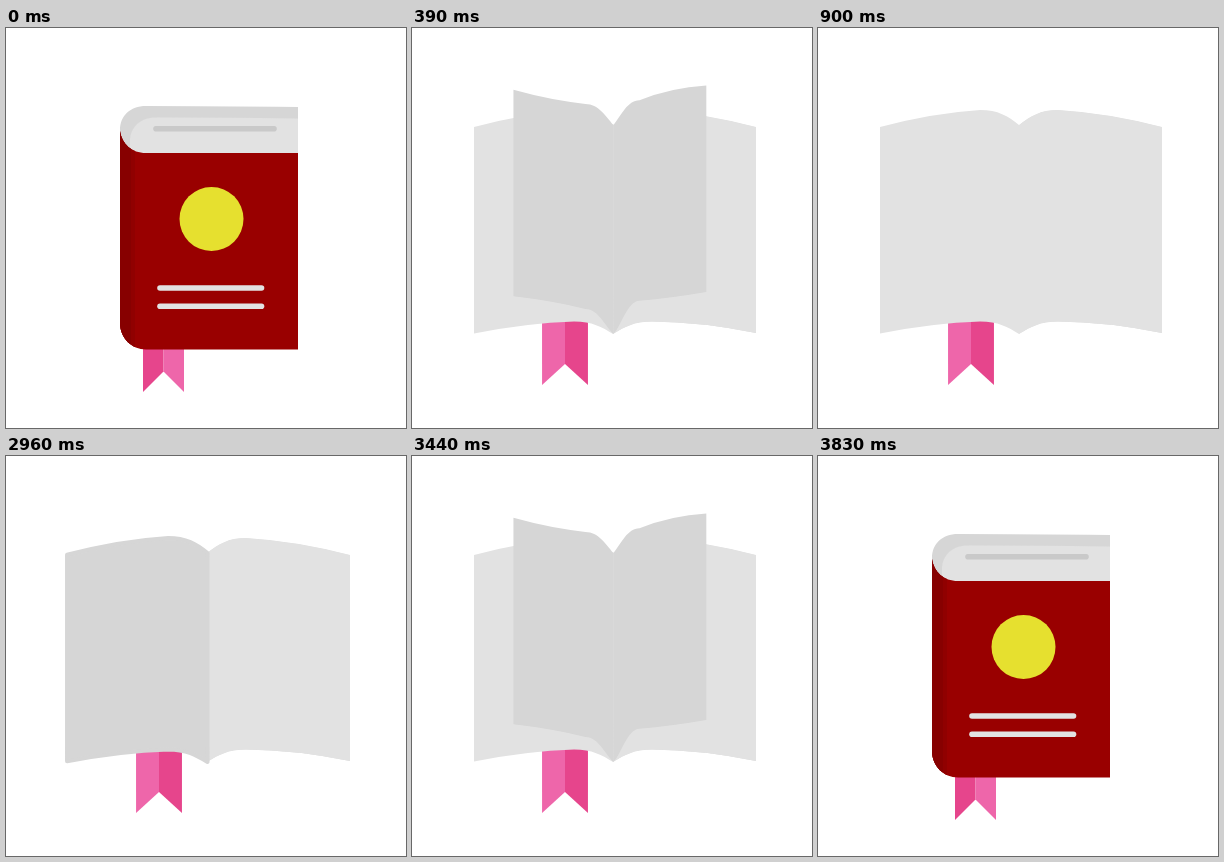
These frames come from a looping animation (400 by 400 pixels, 4860 ms). An HTML page with a canvas:

```html
<!DOCTYPE html>
<html lang="en">
<head>
<meta charset="utf-8">
<title>Opening book</title>
<style>
  html, body { margin: 0; width: 100%; height: 100%; overflow: hidden; background: #fff; }
  canvas { display: block; width: 400px; height: 400px; }
</style>
</head>
<body>
<canvas id="stage" width="400" height="400"></canvas>
<script>
const ctx = document.getElementById('stage').getContext('2d');
const LIGHT = '#e2e2e2', SHADE = '#d6d6d6';
const LOOP = 4860, STEP = 30, OPEN_AT = 900, CLOSE_AT = 2960, CLOSED_AT = 3830;
const COVER_TIME = 365, FLIP_TIME = 286, FIRST_FLIP = 175, FLIP_GAP = 137, FLIPS = 4;

const mix = (a, b, p) => a + (b - a) * p;
const clamp = v => Math.min(1, Math.max(0, v));
const smooth = v => v * v * (3 - 2 * v);

function fill(path, color) {
  ctx.fillStyle = color;
  ctx.fill(path);
}

function withClip(path, draw) {
  ctx.save();
  ctx.clip(path);
  draw();
  ctx.restore();
}

// A leaf bound at the spine; w is its signed width, lift raises the free edge.
function leafPath(spine, w, lift, lean) {
  const x = f => spine + w * f;
  const path = new Path2D();
  const knee = 82 - lift * (0.2 + 0.05 * lean);
  const foot = 293.5 - lift * (0.42 + 0.12 * lean);
  path.moveTo(spine, 97);
  path.bezierCurveTo(x(0.08), 88, x(0.15), knee, x(0.28), knee);
  path.quadraticCurveTo(x(0.62), 85 - lift * (0.48 + 0.2 * lean), x(1), 99 - lift);
  path.lineTo(x(1), 305.5 - lift);
  path.quadraticCurveTo(x(0.62), 295 - lift * 0.6, x(0.28), foot);
  path.bezierCurveTo(x(0.15), foot, x(0.08), 299, spine, 306);
  path.closePath();
  return path;
}

// Right-hand block of pages, from a rounded closed end to an open leaf.
function blockPath(spine, p) {
  const edge = mix(292, 344, p), drop = Math.pow(p, 1.5);
  const y = mix(102, 97, p), foot = mix(283, 293.5, p);
  const path = new Path2D();
  path.moveTo(spine, y);
  path.bezierCurveTo(spine + mix(0, 12, p), y - mix(14, 9, p),
    spine + mix(10, 21, p), y - mix(24, 15, p),
    spine + mix(26, 39, p), y - mix(24, 15, p));
  path.quadraticCurveTo(spine + 89, mix(78, 85, p), edge, mix(79, 99, drop));
  path.lineTo(edge, mix(284, 305, drop));
  path.quadraticCurveTo(spine + 89, mix(283, 294, p), spine + 39, foot);
  path.bezierCurveTo(spine + 21, foot, spine + 12, mix(292, 299, p), spine, mix(300, 306, p));
  path.closePath();
  return path;
}

function coverPath(spine, edge, top, bottom, p) {
  const bend = Math.min(26, (edge - spine) / 2);
  const foot = bottom - 32 * p;
  const path = new Path2D();
  path.moveTo(spine, 103 + 32 * p);
  path.bezierCurveTo(spine + 2, 116 + 24 * p, spine + bend * 0.45, top - 4 * p, spine + bend, top - 4 * p);
  path.quadraticCurveTo(mix(spine + bend, edge, 0.5), top, edge, top);
  path.lineTo(edge, bottom);
  path.lineTo(spine + bend, foot);
  path.bezierCurveTo(spine + bend * 0.45, foot, spine, 310 + 16 * p, spine, 295 + 32 * p);
  path.closePath();
  return path;
}

function drawBookmark(p) {
  const center = 157.5 + 47.7 * p - 52.2 * p * p;
  const scale = 1 - 0.94 * p - 1.18 * p * p;
  const tip = mix(364, 357, p), notch = mix(343.5, 336, p);
  for (const [side, color] of [[-1, '#e6458c'], [1, '#ee66aa']]) {
    const x = center + side * 20.5 * scale;
    ctx.fillStyle = color;
    ctx.beginPath();
    ctx.moveTo(center, 290);
    ctx.lineTo(x, 290);
    ctx.lineTo(x, tip);
    ctx.lineTo(center, notch);
    ctx.fill();
  }
}

function drawBar(x1, x2, y) {
  ctx.beginPath();
  ctx.moveTo(x1, y);
  ctx.lineTo(x2, y);
  ctx.stroke();
}

function drawBlock(spine, p) {
  const block = blockPath(spine, p);
  const rim = 1 - p * p;
  fill(block, rim > 0 ? SHADE : LIGHT);
  withClip(block, () => {
    ctx.translate(10 * rim, 11.5 * rim);
    fill(block, LIGHT);
    ctx.fillRect(spine + 30, 150, 200, 200);
  });
  if (p < 0.25) {
    ctx.save();
    ctx.globalAlpha = 1 - p * 4;
    ctx.strokeStyle = '#c9c9c9';
    drawBar(spine + 36, spine + 154, 100.7);
    ctx.restore();
  }
}

function drawCover(spine, edge, top, bottom, p) {
  const cover = coverPath(spine, edge, top, bottom, p);
  fill(cover, '#990000');
  withClip(cover, () => {
    ctx.fillStyle = '#900000';
    ctx.fillRect(spine, 90, 15, 260);
    ctx.fillStyle = '#870000';
    ctx.fillRect(spine, 90, 11, 260);
    const scale = 1 - 2.03 * p;
    if (scale <= 0) return;
    ctx.transform(scale, 0.4 * p, 0, 1, 205.5 - 94 * p, -8 * p);
    ctx.fillStyle = '#e6e02f';
    ctx.beginPath();
    ctx.arc(0, 191, 32, 0, Math.PI * 2);
    ctx.fill();
    ctx.strokeStyle = LIGHT;
    drawBar(-51.5, 50, 260);
    drawBar(-51.5, 50, 278.3);
  });
}

function drawFlip(u) {
  if (u <= 0 || u >= 1) return;
  const angle = u * Math.PI, lean = Math.cos(angle);
  const lift = 63 * Math.pow(Math.sin(angle), 1.5);
  const leaf = leafPath(201.5, mix(140.5, 142, (1 + lean) / 2) * lean, lift, lean);
  fill(leaf, SHADE);
  if (lean < -0.9) {
    ctx.save();
    ctx.strokeStyle = SHADE;
    ctx.lineWidth = 4;
    ctx.lineJoin = 'round';
    ctx.stroke(leaf);
    ctx.restore();
  }
}

function drawBook(time) {
  const p = smooth(clamp(time / COVER_TIME));
  const spine = mix(114, 201, p), edge = mix(292, 62, p);
  const top = 125 + 54 * p - 80 * p * p;
  const bottom = 321.5 + 77.5 * p - 93 * p * p;
  ctx.clearRect(0, 0, 400, 400);
  ctx.lineWidth = 5.6;
  ctx.lineCap = 'round';
  drawBookmark(p);
  drawBlock(spine, p);
  if (edge > spine) {
    drawCover(spine, edge, top, bottom, p);
  } else {
    fill(leafPath(spine, edge - spine, 99 - top, -1), LIGHT);
    ctx.fillRect(spine - 1, 98, 2, 206);
  }
  for (let i = 0; i < FLIPS; i++) {
    drawFlip((time - FIRST_FLIP - i * FLIP_GAP) / FLIP_TIME);
  }
}

// Closing plays the opening backwards.
function poseTime(t) {
  const stepped = Math.floor(t / STEP) * STEP;
  if (t < CLOSE_AT) return Math.min(stepped, OPEN_AT);
  const closing = Math.floor((t - CLOSE_AT) / STEP) * STEP;
  return Math.max(0, CLOSED_AT - CLOSE_AT - closing);
}

const start = performance.now();
function tick() {
  drawBook(poseTime((performance.now() - start) % LOOP));
  requestAnimationFrame(tick);
}
tick();
</script>
</body>
</html>
```
